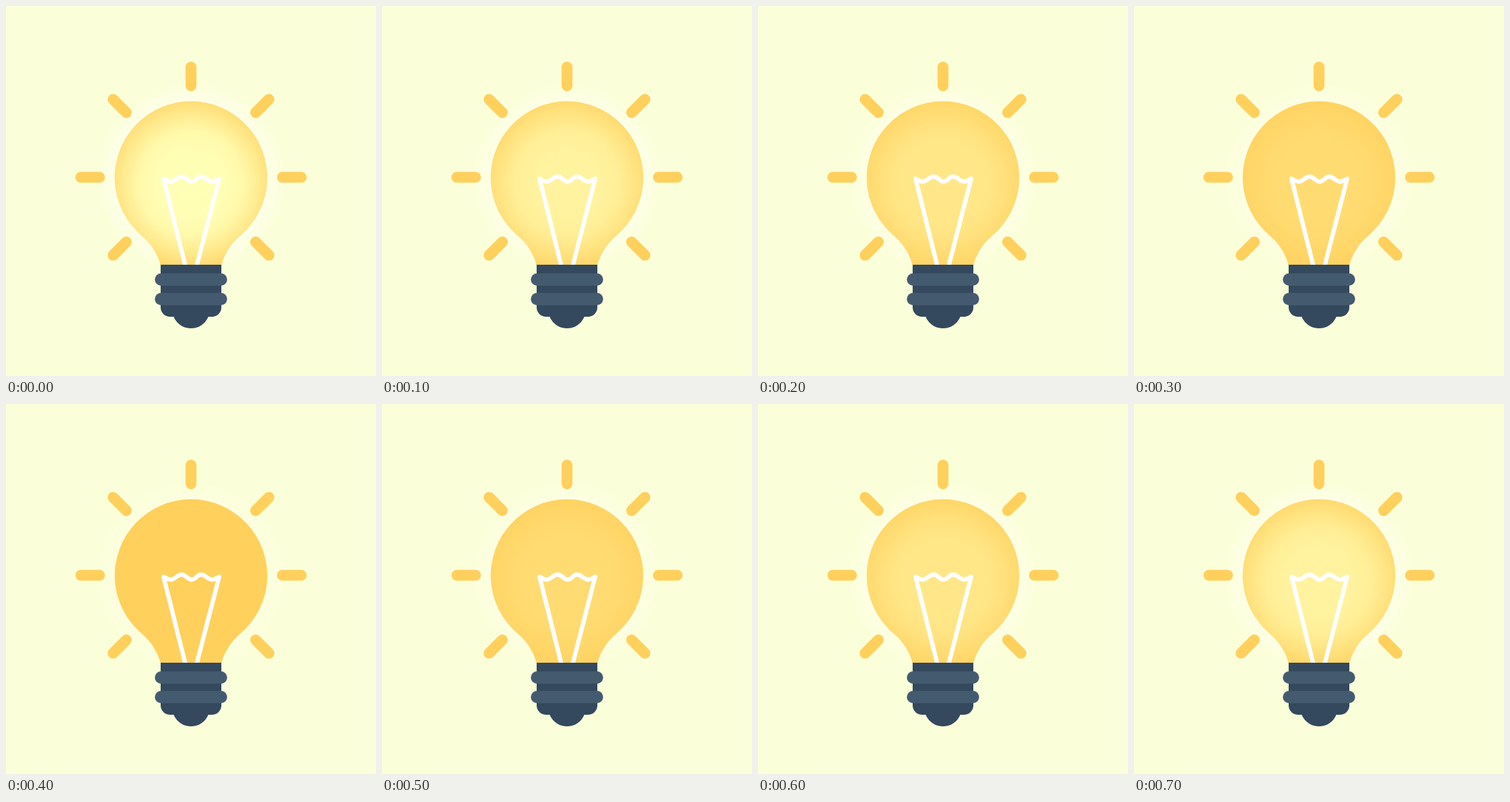
An HTML page that plays this animation: 512 px wide and 512 px high, repeating every 0.8 s.

```html
<!DOCTYPE html>
<html lang="en">
<head>
<meta charset="utf-8">
<title>Glowing bulb</title>
<style>
  html, body { margin: 0; height: 100%; overflow: hidden; background: #fbffd9; }
  svg { display: block; width: 100%; height: 100%; }
</style>
</head>
<body>
<svg viewBox="0 0 512 512">
  <defs>
    <radialGradient id="inner" gradientUnits="userSpaceOnUse" cx="256" cy="245" r="122">
      <stop offset="0" stop-color="#ffffb6"/>
      <stop offset=".4" stop-color="#ffffb6" stop-opacity=".98"/>
      <stop offset=".6" stop-color="#ffffb6" stop-opacity=".86"/>
      <stop offset=".8" stop-color="#ffffb6" stop-opacity=".52"/>
      <stop offset="1" stop-color="#ffffb6" stop-opacity=".14"/>
    </radialGradient>
    <radialGradient id="outer" gradientUnits="userSpaceOnUse" cx="256" cy="238" r="130">
      <stop offset=".78" stop-color="#fffff0" stop-opacity=".75"/>
      <stop offset=".9" stop-color="#fffff0" stop-opacity=".4"/>
      <stop offset="1" stop-color="#fffff0" stop-opacity="0"/>
    </radialGradient>
    <path id="glass" d="M214 359C210 343 201 329 188 318A105.5 105.5 0 1 1 324 318C311 329 302 343 298 359Z"/>
  </defs>

  <circle id="halo" cx="256" cy="238" r="130" fill="url(#outer)"/>
  <g id="rays" stroke="#ffd05c" stroke-width="15" stroke-linecap="round"></g>
  <use href="#glass" fill="#ffd05c"/>
  <use id="light" href="#glass" fill="url(#inner)"/>

  <path d="M248 359L218 239C222 241 224 243 228 243C234 243 237 236 243 236S251 243 257 243S264 236 270 236S279 243 285 243C289 243 291 241 295 239L264 359"
        fill="none" stroke="#fff" stroke-width="6" stroke-linecap="round" stroke-linejoin="round"/>

  <g fill="#34495e">
    <path d="M214 358H298V417A13 13 0 0 1 285 430H280A26 26 0 0 1 232 430H227A13 13 0 0 1 214 417Z"/>
    <g fill="#445a6f">
      <rect x="206" y="370" width="100" height="17" rx="8.5"/>
      <rect x="206" y="397" width="100" height="17" rx="8.5"/>
    </g>
  </g>
</svg>
<script>
  const byId = id => document.getElementById(id);
  const STEP = 100, STEPS = 8;

  // Seven rays; the socket takes the eighth place.
  byId('rays').innerHTML = [-135, -90, -45, 0, 45, 90, 135]
    .map(a => `<path d="M256 84.5V110.5" transform="rotate(${a} 256 237)"/>`).join('');

  function draw(now) {
    const step = Math.floor(now / STEP) % STEPS;
    const level = Math.abs(step - STEPS / 2) / (STEPS / 2);
    byId('light').style.opacity = level;
    byId('halo').style.opacity = 0.4 + 0.6 * level;
  }

  const start = performance.now();
  function tick() {
    draw(performance.now() - start);
    requestAnimationFrame(tick);
  }
  tick();
</script>
</body>
</html>
```
